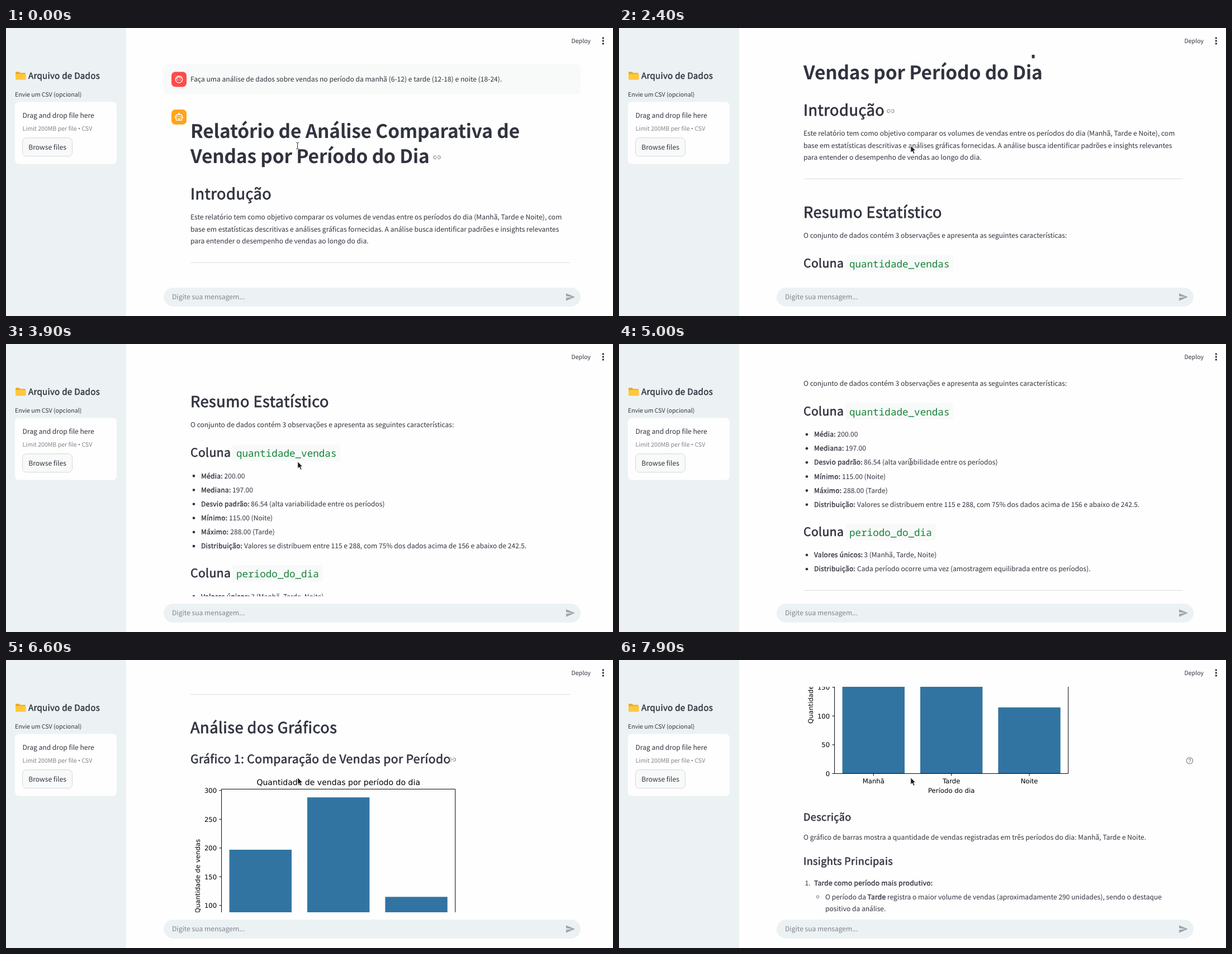
An HTML page that plays this animation: 1086 by 516 pixels, repeating every 8 s.

```html
<!DOCTYPE html>
<html lang="pt-BR">
<head>
<meta charset="utf-8">
<title>Relatório de vendas</title>
<style>
  html, body { margin: 0; width: 100%; height: 100%; overflow: hidden; background: #fefefe; }
  svg { display: block; }
  text { font: 12.08px "Noto Sans CJK JP", "Noto Sans CJK SC", "Noto Sans", sans-serif; fill: #31333f; text-rendering: geometricPrecision; }
  /* Semibold: the regular cut, thickened by a thin outline */
  .h2, .h3, .h4, .side, .b { stroke: #31333f; stroke-width: .029em; letter-spacing: .019em; }
  .h1 { font-size: 33.48px; font-weight: 700; letter-spacing: -.005em; }
  .h2 { font-size: 27.18px; }
  .h3 { font-size: 21.14px; }
  .h4 { font-size: 18.12px; }
  .side { font-size: 15.1px; }
  .small { font-size: 10.57px; }
  .muted { fill: #83848c; }
  .bullet { font-family: "Noto Sans", sans-serif; }
  .code { font: 17.6px "Noto Sans Mono", "DejaVu Sans Mono", monospace; fill: #158237; }
  .plot, .title { font: 11.7px "DejaVu Sans", sans-serif; fill: #000; }
  .title { font-size: 14.05px; }
  .mid { text-anchor: middle; }
  .end { text-anchor: end; }
  .line { fill: none; stroke: #000; stroke-width: 1; }
  .link { fill: none; stroke: #83848c; stroke-width: 2; stroke-linecap: round; }
</style>
</head>
<body>
<svg width="1086" height="516" viewBox="0 0 1086 516">
  <clipPath id="view"><rect x="215" y="48" width="871" height="404"/></clipPath>
  <g clip-path="url(#view)"><g id="page"></g></g>
  <g id="frame"></g>
  <g id="beam" fill="none">
    <path d="M519 205.3h1.6l1 .8 1-.8h1.6M521.6 206v10M519 216.7h1.6l1-.8 1 .8h1.6" stroke="#fff" stroke-width="2.4" opacity=".7"/>
    <path d="M519 205.3h1.6l1 .8 1-.8h1.6M521.6 206v10M519 216.7h1.6l1-.8 1 .8h1.6" stroke="#222"/>
  </g>
  <path id="arrow" d="M521.8 210.6v12.6l2.9-2.6 2.2 4.8 2.3-1.1-2.2-4.6h3.9z" fill="#1c1c1c" stroke="#fff" stroke-width=".9"/>
</svg>
<script>
const $ = id => document.getElementById(id);
const text = (x, y, str, cls = '', extra = '') => `<text x="${x}" y="${y}" class="${cls}" ${extra}>${str}</text>`;
const rect = (x, y, w, h, fill, r = 0, extra = '') =>
  `<rect x="${x}" y="${y}" width="${w}" height="${h}" rx="${r}" fill="${fill}" ${extra}/>`;
const dot = (x, y, r, fill = '#31333f', extra = '') => `<circle cx="${x}" cy="${y}" r="${r}" fill="${fill}" ${extra}/>`;
const path = (d, extra) => `<path d="${d}" ${extra}/>`;
const rule = y => rect(330, y - .45, 679, .9, '#d6d6d9');

const item = (y, label, x, rest) =>
  dot(336, y - 4.2, 2.3) + text(349, y, label, 'b') + text(x, y, rest);

const column = (y, name, width) =>
  text(330, y, 'Coluna', 'h3') + rect(405, y - 22, width, 30, '#f8f9f9', 4) + text(412, y, name, 'code');

const link = (id, x, y) => `<g id="${id}" class="link" transform="translate(${x} ${y}) scale(.55) translate(-12 -12)">
  <path d="M15 7h3a5 5 0 0 1 0 10h-3M9 17H6a5 5 0 0 1 0-10h3M8 12h8"/></g>`;

const avatars = () =>
  rect(296, 78.5, 27, 27, '#ff4b4b', 7) +
  dot(309.5, 92, 6.2, 'none', 'stroke="#fff" stroke-width="1.3"') +
  path('M303.5 91q4-1 5.3-4.5 2 3.6 6.7 3.2', 'fill="none" stroke="#fff" stroke-width="1.2"') +
  dot(307.2, 93, .9, '#fff') + dot(311.8, 93, .9, '#fff') +
  rect(296, 146, 27, 27, '#ffa41c', 7) +
  rect(304.3, 155.2, 10.4, 10, 'none', 1.2, 'stroke="#fff" stroke-width="1.4"') +
  path('M309.5 155v-2M302.8 158.5v3M316.2 158.5v3M306.8 162.8h5.4', 'stroke="#fff" stroke-width="1.4"') +
  dot(309.5, 153, 1.3, '#fff') + dot(307.3, 159, 1.1, '#fff') + dot(311.7, 159, 1.1, '#fff');

function chart() {
  const left = 385.6, top = 1062.1, width = 418.2, bottom = 1373.6, middle = left + width / 2;
  const yOf = v => bottom - v * 311.5 / 302.4;
  let out = rect(330, 1034, 480, 380, '#fefefe');
  [['Manhã', 197], ['Tarde', 288], ['Noite', 115]].forEach(([name, value], i) => {
    const x = left + width / 3 * (i + .5);
    out += rect(x - 55.7, yOf(value), 111.4, bottom - yOf(value), '#3274a1') +
      path(`M${x} ${bottom}v4.1`, 'class="line"') + text(x, bottom + 17.5, name, 'plot mid');
  });
  for (let v = 0; v <= 300; v += 50)
    out += path(`M${left} ${yOf(v)}h-4.1`, 'class="line"') + text(377.2, yOf(v) + 4.4, v, 'plot end');
  const midY = (top + bottom) / 2;
  return out + path(`M${left} ${top}h${width}V${bottom}H${left}z`, 'class="line"') +
    text(middle, top - 7, 'Quantidade de vendas por período do dia', 'title mid') +
    text(middle, bottom + 34.6, 'Período do dia', 'plot mid') +
    text(346.6, midY, 'Quantidade de vendas', 'plot mid', `transform="rotate(-90 346.6 ${midY})"`);
}

$('page').innerHTML = [
  rect(282, 65, 746, 53.6, '#f8f9f9', 7),
  avatars(),
  text(330, 96.2, 'Faça uma análise de dados sobre vendas no período da manhã (6-12) e tarde (12-18) e noite (18-24).'),
  text(330, 197.2, 'Relatório de Análise Comparativa de', 'h1'),
  text(330, 241.6, 'Vendas por Período do Dia', 'h1'),
  link('linkTitle', 771, 231.8),
  text(330, 307.2, 'Introdução', 'h2'),
  link('linkIntro', 486, 299),
  text(330, 343.1, 'Este relatório tem como objetivo comparar os volumes de vendas entre os períodos do dia (Manhã, Tarde e Noite), com'),
  text(330, 364.6, 'base em estatísticas descritivas e análises gráficas fornecidas. A análise busca identificar padrões e insights relevantes'),
  text(330, 386.1, 'para entender o desempenho de vendas ao longo do dia.'),
  rule(420.2),
  text(330, 490.2, 'Resumo Estatístico', 'h2'),
  text(330, 526.2, 'O conjunto de dados contém 3 observações e apresenta as seguintes características:'),
  column(578.9, 'quantidade_vendas', 193),
  ...[
    ['Média:', 390.5, '200.00'],
    ['Mediana:', 405, '197.00'],
    ['Desvio padrão:', 438, '86.54 (alta variabilidade entre os períodos)'],
    ['Mínimo:', 399, '115.00 (Noite)'],
    ['Máximo:', 401.3, '288.00 (Tarde)'],
    ['Distribuição:', 426, 'Valores se distribuem entre 115 e 288, com 75% dos dados acima de 156 e abaixo de 242.5.']
  ].map((row, i) => item(617.3 + 25.15 * i, ...row)),
  column(794.8, 'periodo_do_dia', 162),
  item(833.3, 'Valores únicos:', 438.3, '3 (Manhã, Tarde, Noite)'),
  item(858.5, 'Distribuição:', 426, 'Cada período ocorre uma vez (amostragem equilibrada entre os períodos).'),
  rule(892.5),
  text(330, 962, 'Análise dos Gráficos', 'h2'),
  text(330, 1015.7, 'Gráfico 1: Comparação de Vendas por Período', 'h3'),
  link('linkChart', 798.5, 1009.3),
  chart(),
  dot(1021, 1350.6, 5.6, 'none', 'stroke="#7f8088" stroke-width="1.2"'),
  path('M1019.2 1349.3q.1-1.9 1.8-1.9t1.8 1.6q0 1-1.1 1.6-.7.4-.7 1.3M1021 1353v1.1', 'fill="none" stroke="#7f8088" stroke-width="1.1"'),
  text(330, 1458, 'Descrição', 'h4'),
  text(330, 1491.8, 'O gráfico de barras mostra a quantidade de vendas registradas em três períodos do dia: Manhã, Tarde e Noite.'),
  text(330, 1537, 'Insights Principais', 'h4'),
  text(332.5, 1574.3, '1.'),
  text(349, 1574.3, 'Tarde como período mais produtivo:', 'b'),
  dot(355.5, 1594.6, 2.2, 'none', 'stroke="#31333f" stroke-width=".7"'),
  text(369, 1598.8, 'O período da'),
  text(444.5, 1598.8, 'Tarde', 'b'),
  text(480, 1598.8, 'registra o maior volume de vendas (aproximadamente 290 unidades), sendo o destaque'),
  text(369, 1620.4, 'positivo da análise.')
].join('');

$('frame').innerHTML = [
  rect(0, 0, 215, 516, '#ecf2f3'),
  path('M17 80q0-1.5 1.5-1.5h5l1.6 2h8.4q1.5 0 1.5 1.5v9H17z', 'fill="#eba61f"'),
  rect(17, 82.3, 18.6, 10.4, '#fdc83f', 1.2),
  text(40, 91.1, 'Arquivo de Dados', 'side'),
  text(16, 123.3, 'Envie um CSV (opcional)', 'small'),
  rect(16, 132.5, 182, 111, '#fefefe', 7),
  text(29.5, 161.2, 'Drag and drop file here'),
  text(29.5, 184.3, 'Limit 200MB per file <tspan class="bullet">•</tspan> CSV', 'small muted'),
  rect(29.5, 196.7, 89, 33.2, '#f8f9f9', 7, 'stroke="#d2d3d6" stroke-width=".9"'),
  text(40.3, 217.8, 'Browse files'),
  text(1011.5, 27.3, 'Deploy', 'small'),
  ...[18, 23, 28].map(y => dot(1068.3, y, 1.7)),
  rect(282, 465.3, 746, 33.7, '#ecf2f3', 16.8),
  text(297, 486.2, 'Digite sua mensagem...', 'muted'),
  path('M2 21 23 12 2 3v7l15 2-15 2z', 'transform="translate(1000.5 472.9) scale(.76)" fill="#a0a5ad"')
].join('');

// Scroll offset in pixels at given times in ms
const scrollKeys = [
  [0, 0], [1300, 0], [1700, 100], [2000, 100], [2400, 150], [2800, 292], [3300, 292], [3500, 327],
  [3600, 327], [3900, 376.7], [4000, 392], [4100, 392], [4400, 445], [4900, 445], [5000, 451.1],
  [5900, 724.6], [6200, 800], [6400, 800], [6500, 807], [7100, 949.6], [7900, 1170.2]
];

function scrollAt(t) {
  const next = scrollKeys.findIndex(key => key[0] > t);
  if (next < 0) return scrollKeys.at(-1)[1];
  const [t0, y0] = scrollKeys[next - 1], [t1, y1] = scrollKeys[next];
  return y0 + (y1 - y0) * (t - t0) / (t1 - t0);
}

const show = (id, on) => $(id).setAttribute('visibility', on ? 'visible' : 'hidden');

function draw(now) {
  const t = Math.floor(now % 8000 / 100) * 100;
  $('page').setAttribute('transform', `translate(0 ${-scrollAt(t)})`);
  const beam = t < 1700 || (t >= 4400 && t < 6200);
  show('beam', beam);
  show('arrow', !beam);
  show('linkTitle', t < 1700);
  show('linkIntro', t >= 1700 && t < 2800);
  show('linkChart', t >= 6200);
}

const start = performance.now();
function loop() {
  draw(performance.now() - start);
  requestAnimationFrame(loop);
}
loop();
</script>
</body>
</html>
```
